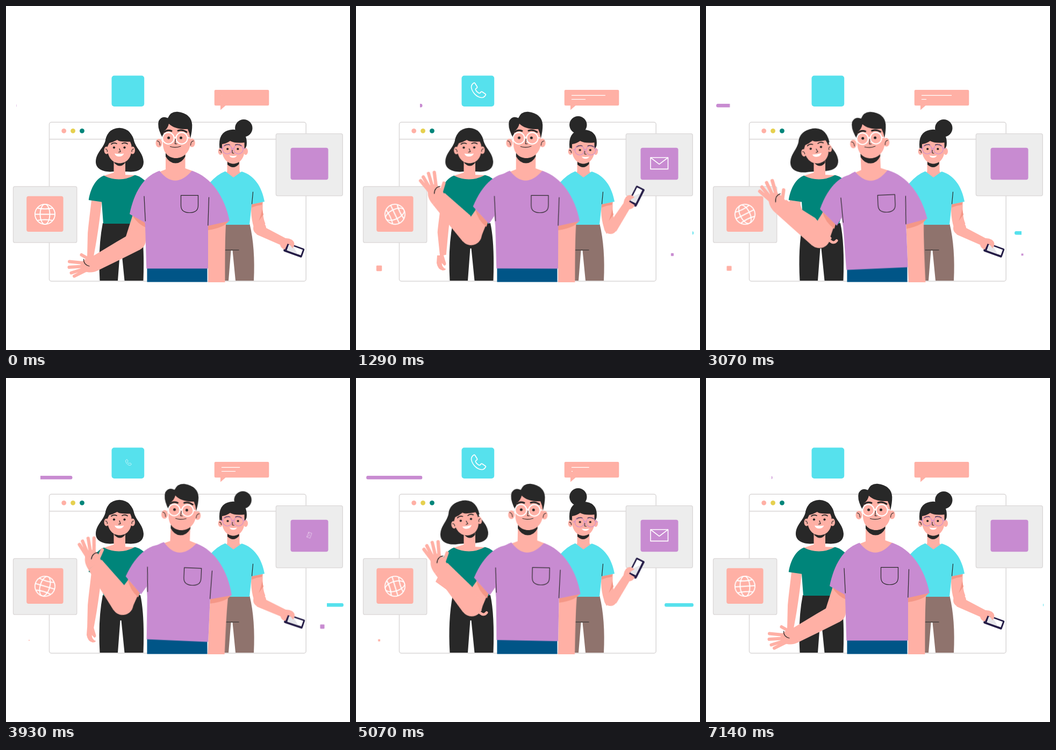
Recreate the animation shown at these times as an HTML page without scripts. Size 640 px wide and 640 px high, loop 7.21 s.

```html
<!DOCTYPE html>
<html lang="en">
<head>
<meta charset="utf-8">
<title>Team</title>
<style>
html, body { margin: 0; width: 100%; height: 100%; overflow: hidden; background: #fff; }
svg { display: block; width: 100vw; height: 100vh; }

.skin { fill: #ffb0a5; }
.shade { fill: #f49787; }
.dark { fill: #282828; }
.green { fill: #00857a; }
.purple { fill: #c88bd1; }
.cyan { fill: #56e1ed; }
.white { fill: #fff; }
.card { fill: #ededed; stroke: #dbd8d8; stroke-width: 1.3; }
.frame { fill: none; stroke: #dad7d7; stroke-width: 1.5; }
.ink { fill: none; stroke: #282828; stroke-width: 1.2; stroke-linecap: round; }
.brow { fill: none; stroke: #282828; stroke-width: 1.8; stroke-linecap: round; }
.thick { stroke-width: 3; }
.icon { fill: none; stroke: #fff; stroke-width: 1.6; stroke-linejoin: round; }
.finger { fill: none; stroke: #ffb0a5; stroke-width: 6; stroke-linecap: round; stroke-linejoin: round; }

/* long: whole loop, half: two per loop, fifth: five per loop */
.long { animation: 7.21s ease-in-out infinite; }
.half { animation: 3.605s linear infinite; }
.fifth { animation: 1.442s linear infinite; transform-box: fill-box; }

.globe { stroke-width: 1.8; animation-name: spin; animation-timing-function: linear; transform-origin: 72.5px 387.5px; }
@keyframes spin { to { transform: rotate(360deg); } }

.bar { animation-name: slide; }
@keyframes slide {
  0% { transform: translateX(-100%); }
  12.9% { transform: translateX(-76%); }
  20.9% { transform: translateX(-55%); }
  41.6%, 51.6% { transform: none; }
  72.5% { transform: translateX(43%); }
  89.5% { transform: translateX(95.5%); }
  95.1% { transform: translateX(99%); }
  100% { transform: translateX(100%); }
}

.call { animation-name: call; transform-origin: 228px 157px; }
@keyframes call {
  0%, 72%, 100% { transform: scale(0); }
  9% { transform: scale(.4); }
  20%, 58% { transform: none; }
  65.5% { transform: scale(.55); }
  68.4% { transform: scale(.25); }
}
.mail { animation-name: mail; transform-origin: 564px 292.5px; }
@keyframes mail {
  0%, 100% { transform: rotate(-110deg) scale(0); }
  9% { transform: rotate(-70deg) scale(.3); }
  20%, 75% { transform: rotate(0deg) scale(1); }
  84% { transform: rotate(-110deg) scale(0); }
}
.dotA { animation-name: dotA; transform-origin: 43px 488px; }
@keyframes dotA {
  0%, 6%, 44%, 56%, 94%, 100% { transform: scale(0); }
  9%, 59% { transform: scale(.15); }
  18%, 35.8%, 69%, 83% { transform: scale(1); }
  40.6% { transform: scale(.38); }
  85.2% { transform: scale(.87); }
}
.dotB { animation-name: dotB; transform-origin: 588.5px 462.5px; }
@keyframes dotB {
  0%, 40.6%, 50%, 90%, 100% { transform: scale(0); }
  9%, 59% { transform: scale(.76); }
  16%, 30%, 66%, 80% { transform: scale(1); }
  35.8% { transform: scale(.48); }
  85.2% { transform: scale(.35); }
}
.line1 { animation-name: line1; }
@keyframes line1 {
  0%, 48%, 50%, 96%, 100% { width: 0; }
  9% { width: 34px; }
  22%, 30%, 78% { width: 75px; }
  35.8% { width: 63px; }
  40.6% { width: 33px; }
  68.4% { width: 47px; }
  85.2% { width: 56px; }
}
.line2 { animation-name: line2; }
@keyframes line2 {
  0%, 42%, 50%, 88%, 100% { width: 0; }
  9%, 35.8%, 59% { width: 26px; }
  13%, 33%, 68.4%, 80% { width: 28px; }
  40.6% { width: 2px; }
  85.2% { width: 9px; }
}

/* left woman */
.headL, .hairL, .armL { animation-timing-function: ease-in-out; }
.headL { animation-name: headL; transform-origin: 211px 300px; }
@keyframes headL {
  0%, 34.7%, 95%, 100% { transform: none; }
  40.5%, 86% { transform: rotate(-10deg); }
}
.hairL { animation-name: hairL; transform-origin: 211px 290px; }
@keyframes hairL {
  0%, 34.7%, 95%, 100% { transform: none; }
  40.5%, 86% { transform: translate(-10px, 0) rotate(-4deg); }
}
.armL { animation-name: armL; }
@keyframes armL {
  0%, 34.7%, 95%, 100% { d: path("M159 361C157 380 153 410 152 425L151 468L163 466C168 440 173 410 178 364Z"); }
  40.5%, 86% { d: path("M156 361C155 366 151 373 148 379L220 431L228 424C198 402 172 380 176 364Z"); }
}
.handDown { animation-name: handDown; }
@keyframes handDown { 0%, 37%, 93%, 100% { opacity: 1; } 37.2%, 92.8% { opacity: 0; } }
.handHip { stroke-width: 5; animation-name: handHip; }
@keyframes handHip { 0%, 39%, 87%, 100% { opacity: 0; } 39.2%, 86.8% { opacity: 1; } }

/* right woman */
.armR { animation-name: armR; transform-origin: 472px 412px; }
@keyframes armR {
  0%, 7%, 81%, 100% { transform: none; }
  9% { transform: rotate(-1deg); }
  26%, 56% { transform: rotate(-83deg); }
  68.4% { transform: rotate(-50deg); }
}
.bun { animation-name: bun; }
@keyframes bun {
  0%, 8%, 81%, 100% { transform: none; }
  26%, 56% { transform: translate(-29px, -6px); }
  68.4% { transform: translate(-17px, -4px); }
}
.faceR { animation-name: faceR; }
@keyframes faceR {
  0%, 8%, 81%, 100% { transform: none; }
  26%, 56% { transform: translate(4.5px, 2px); }
  68.4% { transform: translate(2.5px, 1px); }
}

/* man */
.body { animation-name: sway; transform-origin: 318px 495px; }
@keyframes sway {
  0%, 11%, 93%, 100% { transform: none; }
  17.9% { transform: rotate(.2deg); }
  30.5%, 54.5% { transform: rotate(2.5deg); }
  42.6% { transform: rotate(-2.5deg); }
  70.3% { transform: rotate(1.1deg); }
  84.2% { transform: rotate(.3deg); }
}
.upper { animation-name: upper; transform-origin: 262px 340px; }
@keyframes upper {
  0%, 4%, 88%, 100% { transform: none; }
  16%, 72% { transform: rotate(17deg); }
  84.2% { transform: rotate(1.5deg); }
}
.sleeve { animation-name: sleeve; }
@keyframes sleeve {
  0%, 4%, 85%, 100% { d: path("M283 308C256 317 238 347 230 387L267 408L290 330Z"); }
  16%, 72% { d: path("M283 304C252 308 233 339 229 385L267 407L290 330Z"); }
}
.fore { animation-name: fore; transform-origin: 241px 436px; }
@keyframes fore {
  0%, 4%, 90%, 100% { transform: none; }
  17.9% { transform: rotate(60deg) scale(1.04); }
  30.5%, 54.5% { transform: rotate(65deg) scale(1.04); }
  42.6% { transform: rotate(53.5deg) scale(1.06); }
  70.3% { transform: rotate(62deg) scale(1.04); }
  84.2% { transform: rotate(12.4deg); }
}
/* the inner elbow fills out when bent */
.crook { animation-name: crook; }
@keyframes crook {
  0%, 4%, 85%, 100% { d: path("M226 427L207 438L158 467.5L173 491L212 472L250 453Z"); }
  16%, 72% { d: path("M226 424L207 430L158 465.5L173 491L212 472L250 453Z"); }
}
.blink { animation-name: blink; transform-origin: 314px 245px; }
@keyframes blink { 0%, 82.6%, 85.8%, 100% { transform: none; } 84.2% { transform: scaleY(.15); } }
</style>
</head>
<body>
<svg viewBox="0 0 640 640">
  <defs>
    <clipPath id="clipA"><rect x="19" y="181.7" width="104.5" height="7" rx="3.5"/></clipPath>
    <clipPath id="clipB"><rect x="574" y="418.8" width="54" height="7" rx="3.5"/></clipPath>
    <clipPath id="floor"><rect width="640" height="513.5"/></clipPath>
  </defs>

  <!-- browser window -->
  <rect class="frame" x="80.5" y="216.3" width="477.7" height="295.7" rx="4"/>
  <path class="frame" d="M80.5 247.7H558"/>
  <circle class="skin" cx="107.7" cy="232.3" r="4.4"/>
  <circle cx="124.6" cy="232.3" r="4.4" fill="#e6d04f"/>
  <circle class="green" cx="141.5" cy="232.3" r="4.4"/>

  <!-- cards -->
  <rect class="card" x="13.5" y="335.8" width="118.3" height="104.4" rx="3"/>
  <rect class="skin" x="38.2" y="353.8" width="68.4" height="66.2" rx="4"/>
  <g class="icon long globe">
    <circle cx="72.5" cy="387.5" r="18.6"/>
    <ellipse cx="72.5" cy="387.5" rx="9" ry="18.6"/>
    <path d="M54 387.5H91M58 376Q72.5 379 87 376M58 399Q72.5 396 87 399"/>
  </g>
  <rect class="card" x="502.3" y="237.7" width="124" height="115.4" rx="3"/>
  <rect class="purple" x="529.5" y="263.8" width="70" height="59.4" rx="4"/>
  <g class="icon half mail"><rect x="548" y="282" width="32.5" height="21.4"/><path d="M548 282L564.2 294.3L580.5 282"/></g>
  <rect class="cyan" x="196.5" y="129.5" width="60.7" height="57.5" rx="5"/>
  <g class="half call">
    <path class="icon" transform="translate(228 157)" d="M-8.500-14Q-13.500-11-13.500-6C-12 4-3 13 6 13.500Q10 13.500 13 9Q14 7.500 12.500 6.500L6.500 2.500Q5 2 4 3.500Q2.500 6 .5 5Q-4.500 2-5.500-1.500Q-6-3-4-4Q-2-5-2.500-6.500L-6.500-13Q-7.300-14.500-8.500-14Z"/>
  </g>
  <path class="skin" d="M390 156H487Q489.300 156 489.300 158V183Q489.300 185.300 487 185.300H408.500L399 193.500V185.300H390Q387.700 185.300 387.700 183V158Q387.700 156 390 156Z"/>
  <rect class="white half line1" x="401" y="165.700" width="0" height="1.300"/>
  <rect class="white half line2" x="401" y="173" width="0" height="1.200"/>

  <!-- accents -->
  <g clip-path="url(#clipA)"><rect class="purple fifth bar" x="19" y="181.700" width="104.500" height="7"/></g>
  <g clip-path="url(#clipB)"><rect class="cyan fifth bar" x="574" y="418.800" width="54" height="7"/></g>
  <rect class="skin half dotA" x="37.800" y="482.800" width="10.400" height="10.400" rx="1.500"/>
  <rect class="purple half dotB" x="583.200" y="457.200" width="10.600" height="10.600" rx="1.500"/>

  <!-- left woman -->
  <path class="dark half hairL" d="M211 229C197 229 187 238 185 250C181 266 167.500 272 167 290C167 304 183 310 200 308H225C245 310 256 304 256 290C255 272 242 266 238 250C236 238 225 229 211 229Z"/>
  <path class="dark" d="M180 404H250Q258 440 255.500 511H220.500L214.500 451H212.500L208 511H174.500Q171 450 180 404Z"/>
  <path class="skin" d="M200.500 285H222V314L243 315L232 326H190L181 316L200.500 310Z"/>
  <path class="dark" d="M201.500 284H221.500V292Q212 303 201.500 292Z"/>
  <path class="skin half handDown" d="M151 464L150 478Q152 490 161 492Q167 492 167 489Q160 487 159.500 478L164 483Q167.500 483 167.500 479L163 464Z"/>
  <path class="skin half armL" d="M159 361C157 380 153 410 152 425L151 468L163 466C168 440 173 410 178 364Z"/>
  <path class="finger half handHip" d="M219 426L231 437Q238 443 243 436.500M224 427L231 432"/>
  <path class="green" d="M182 315.500C167 321 157 340 153.800 361L178 364.500L181 405H248L266 332Q252 317 240 314.500Q211 330 182 315.500Z"/>
  <g class="half headL">
    <ellipse class="skin" cx="187" cy="268.500" rx="4.500" ry="7"/>
    <ellipse class="skin" cx="235.500" cy="268.500" rx="4.500" ry="7"/>
    <path class="skin" d="M189 246H233.500V268C233 284 223 292.500 211.500 292.500S190 284 189 268Z"/>
    <path class="dark" d="M184.500 258Q185 228 211 226.700Q236 228 237.500 257L234 260L231 252.500Q210 253 207 249Q200 253 192 255L189 261Z"/>
    <path class="brow" d="M196 257Q200 253.500 206 256M216 256Q221 253 226 256.500"/>
    <circle class="dark" cx="201" cy="263.300" r="2.100"/><circle class="dark" cx="220.500" cy="263.300" r="2.100"/>
    <path class="ink" d="M211 265.500L213 271L209.500 272M185 266Q188.500 266 188.500 271M237.500 266Q234 266 234 271"/>
    <path class="white" d="M202 274.500Q211 276 219.500 274.500Q217 280 210.500 280Q204 280 202 274.500Z"/>
  </g>

  <!-- right woman -->
  <path fill="#8f736d" d="M395 406H453.500Q464 450 461 511H427L421.500 455H418.500L414 511H395Z"/>
  <path class="ink" d="M408 454H433"/>
  <path class="skin" d="M411.500 285H434.500V308L440 312L423 322L406 312L411.500 308Z"/>
  <path class="dark" d="M412 286H433.500V294Q423 305.500 412 295Z"/>
  <path class="skin" d="M456.500 366L478 362Q476 390 482.500 405L466 424Q454 400 456.500 366Z"/>
  <path class="shade" d="M457 368L477 365.500L476 370Q466 371 457 375Z"/>
  <path class="shade" d="M476.500 378L479 388L470 400Q475 388 476.500 378Z"/>
  <g class="half armR">
    <circle class="skin" cx="472" cy="413.500" r="12"/>
    <path class="skin" d="M478.500 410L522 433L514 446L466 425Z"/>
    <g transform="rotate(20 536 454)">
      <rect x="517.500" y="445.300" width="36.500" height="17.500" rx="2" fill="#241c46"/>
      <rect class="white" x="523.500" y="448" width="27.500" height="11"/>
      <path d="M523.500 448H532L545 459H523.500Z" fill="#e6e6ea"/>
    </g>
    <path class="skin" d="M513 433Q524 430 532 435Q538 440 536 446L533 451L529 445L524 442L519 453Q511 451 510 444Z"/>
  </g>
  <path class="cyan" d="M408 307.500L423 319L438.500 308C462 315 476 336 481 364L457 369L453 407H378V330Q393 313 408 307.500Z"/>
  <path class="ink" d="M459.500 346L457.500 368"/>
  <circle class="dark half bun" cx="442.300" cy="227.300" r="16.200"/>
  <path class="dark" d="M397.500 266Q393 231 422.500 229.700Q451 231 447.500 260L444 268H400Z"/>
  <ellipse class="skin" cx="399" cy="270.500" rx="4.300" ry="6.500"/>
  <ellipse class="skin" cx="446" cy="270.500" rx="4" ry="6.500"/>
  <path class="skin" d="M402 257Q410 256 417 251Q426 256 443.500 254V270C443 285 433 293.500 423 293.500S403 285 402 270Z"/>
  <path class="ink" d="M397 268.500Q400.500 268 400.500 273"/>
  <g class="half faceR">
    <path class="brow" d="M406 260Q411 256.500 416 258.500M427 258.500Q433 256.500 438 260"/>
    <g fill="none" stroke="#c88bd1" stroke-width="1.100"><circle cx="411.500" cy="266.500" r="8.700"/><circle cx="432.500" cy="266.500" r="8.700"/><path d="M420 265.500Q422 264 424 265.500M403 265L399 266M441 265L446 266"/></g>
    <circle class="dark" cx="412.200" cy="266" r="2.100"/><circle class="dark" cx="431.300" cy="266" r="2.100"/>
    <path class="ink" d="M421 268V273.500L424 274"/>
    <path class="white" d="M415.500 278.300Q422.500 279.500 429.500 278.300Q427.500 282.300 422.500 282.300T415.500 278.300Z"/>
  </g>

  <!-- man -->
  <path d="M262.500 484H374.500V513.500H262.500Z" fill="#005587"/>
  <g clip-path="url(#floor)"><g class="long body">
    <path class="skin" d="M376 400L410 396Q407 420 407.500 520H376Z"/>
    <path class="shade" d="M376 407L415 399Q408 412 376 417Z"/>
    <g class="long upper">
      <path class="skin" d="M237 385L222 432L241 455L260 436L263 400Z"/>
      <path class="shade" d="M234 388L264 404V414Q244 406 234 388Z"/>
      <g class="long fore">
        <circle class="skin" cx="241" cy="436" r="19"/>
        <path class="skin long crook" d="M226 427L207 438L158 467.500L173 491L212 472L250 453Z"/>
        <path class="skin" d="M160 466.500L150 470Q139 474 138 484Q139 494 151 495Q162 497 173 491Z"/>
        <path class="finger" d="M143 478L118 475.500M142 484.500L117.500 486M144 489.500L121.500 496.500M150 491L127 502.700M158 473L140.500 463"/>
        <path class="ink" d="M144.500 471Q144 481 155 484"/>
      </g>
      <path class="purple long sleeve" d="M283 308C256 317 238 347 230 387L267 408L290 330Z"/>
    </g>
    <path class="skin" d="M297 270H333.500V302L350 308L338 330H295L282 310L297 304Z"/>
    <path class="dark" d="M297 268H333.500V280Q327 292.500 315.500 292.500T297 280Z"/>
    <path class="purple" d="M285.500 306.500Q314 343 346 306.500C382 318 407 355 416 400L376 409V488.500H261.300L259 410L252 345C258 325 270 312 285.500 306.500Z"/>
    <path class="ink" d="M257 354L259.300 400M377.500 356L375.800 408M325.500 352.300H357.500V371Q357.500 384.500 341.500 384.500T325.500 371Z"/>
    <ellipse class="skin" cx="284.500" cy="255" rx="6" ry="8"/>
    <ellipse class="skin" cx="346" cy="254.500" rx="5.800" ry="8"/>
    <path class="skin" d="M291 215H343V255C342 273 329 283 316 283S293 274 292 258Z"/>
    <path class="dark" d="M288.500 240Q281 224 284 214Q290 203 301 208.500Q306 196 319 196.700Q345 200 346.300 221Q346.500 232 343 246Q342 237 338 229Q314 230 303 219Q301 228 294 233L292 246Z"/>
    <path class="brow thick" d="M294.500 234.500Q300 229.500 308 232.500M320 232Q328 229 336 234.500"/>
    <g fill="none" stroke="#fff" stroke-width="2"><circle cx="302" cy="246" r="10.700"/><circle cx="327" cy="246" r="10.700"/><path d="M312.700 245Q314.500 243.500 316.300 245M291 245H288M337.700 245L342 245.500"/></g>
    <g class="dark long blink"><circle cx="302.600" cy="245.300" r="2.500"/><circle cx="325.500" cy="245.300" r="2.500"/></g>
    <path class="ink" d="M315.500 247.500L314.500 256.500H318M305.500 261.500Q315 264.500 325 261M281 251Q286 251 286.500 259M349 251Q344 251 343.500 259"/>
  </g></g>
</svg>
</body>
</html>
```
